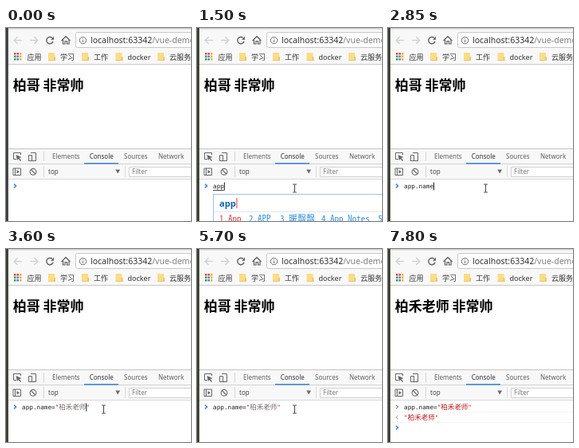
An HTML page with a canvas that plays this animation: 232x242 px, repeating every 7950 ms.

```html
<!DOCTYPE html>
<html lang="zh">
<head>
<meta charset="utf-8">
<title>Console demo</title>
<style>
html, body { margin: 0; width: 100%; height: 100%; overflow: hidden; background: #fff; }
canvas { display: block; width: 232px; height: 242px; }
</style>
</head>
<body>
<canvas id="stage"></canvas>
<script>
const W = 232, H = 242, LOOP = 7950;
const UI = '"Noto Sans", "Noto Sans CJK SC", "Noto Sans CJK", sans-serif';
const CJK = '"Noto Sans CJK SC", "Noto Sans CJK", "Noto Sans", sans-serif';
const CJK_MONO = '"Noto Sans Mono CJK SC", "Noto Sans CJK SC", "Noto Sans CJK", monospace';
const MONO = '"DejaVu Sans Mono", monospace';
const OLD_NAME = '柏哥', NEW_NAME = '柏禾老师';
const RED = '#c41a16';

const canvas = document.getElementById('stage');
const ctx = canvas.getContext('2d');
const scale = window.devicePixelRatio || 1;
canvas.width = Math.round(W * scale);
canvas.height = Math.round(H * scale);

function box(x, y, w, h, color) {
  ctx.fillStyle = color;
  ctx.fillRect(x, y, w, h);
}

function text(str, x, y, size, color, family = UI, weight = 400) {
  ctx.font = `${weight} ${size}px ${family}`;
  ctx.fillStyle = color;
  ctx.fillText(str, x, y);
  return x + ctx.measureText(str).width;
}

function line(points, color, width = 1, close = false) {
  ctx.beginPath();
  points.forEach(([x, y]) => ctx.lineTo(x, y));
  if (close) ctx.closePath();
  ctx.strokeStyle = color;
  ctx.lineWidth = width;
  ctx.stroke();
}

function fill(points, color) {
  ctx.beginPath();
  points.forEach(([x, y]) => ctx.lineTo(x, y));
  ctx.closePath();
  ctx.fillStyle = color;
  ctx.fill();
}

function arc(x, y, r, color, width = 1, from = 0, to = 7) {
  ctx.beginPath();
  ctx.arc(x, y, r, from, Math.min(to, from + Math.PI * 2));
  ctx.strokeStyle = color;
  ctx.lineWidth = width;
  ctx.stroke();
}

function arrow(x, y, dir, color) {
  line([[x - 5 * dir, y], [x + 4.5 * dir, y]], color, 1.3);
  line([[x + .3 * dir, y - 4.5], [x + 4.8 * dir, y], [x + .3 * dir, y + 4.5]], color, 1.3);
}

function folder(x) {
  box(x, 31, 8, 10, '#fbdc86');
  box(x + 7, 36, 2, 5, '#f0c75e');
  box(x, 40, 9, 1, '#efc766');
}

function browser() {
  box(3, 0, W, 46, '#f8f8f8');
  box(3, 0, W, 1.5, '#cfcfcf');
  arrow(15, 15.5, -1, '#d0d0d0');
  arrow(35, 15.5, 1, '#d0d0d0');
  arc(55, 15.5, 4.2, '#606060', 1.4, .3, 5.4);
  fill([[56, 14.8], [60, 14.8], [60, 10.5]], '#606060');
  line([[69.5, 16], [75, 10.5], [80.5, 16]], '#606060', 1.3);
  line([[71.5, 15], [71.5, 20], [74, 20], [74, 16.5], [76.5, 16.5], [76.5, 20], [79, 20], [79, 15]], '#606060', 1.2);

  ctx.beginPath();
  ctx.roundRect(87.5, 5.5, 160, 19, 2);
  ctx.fillStyle = '#fff';
  ctx.fill();
  ctx.strokeStyle = '#c8c8c8';
  ctx.lineWidth = 1;
  ctx.stroke();
  arc(96.5, 15.5, 4.2, '#707070');
  box(96, 15, 1, 3, '#707070');
  box(96, 13, 1, 1, '#707070');
  const end = text('localhost:63342', 106, 19, 10.5, '#333');
  text('/vue-demo', end, 19, 10.5, '#808080');

  const dots = ['#e0483e', '#e0483e', '#f0b32c', '#3f9a57', '#4683df', '#f0b32c', '#3f9a57', '#4683df', '#f0b32c'];
  dots.forEach((c, i) => box(10 + i % 3 * 3.5, 31 + Math.floor(i / 3) * 3.5, 2.5, 2.5, c));
  text('应用', 26.5, 39.5, 9, '#333', CJK);
  [[53, '学习'], [95, '工作'], [137.5, 'docker'], [190, '云服务']].forEach(([x, label]) => {
    folder(x);
    text(label, x + 15, 39.5, 9, '#333', label === 'docker' ? UI : CJK);
  });
  box(3, 45, W, 1, '#c8c8c8');
}

function devtools() {
  const ink = '#666';
  box(3, 151, W, 39, '#f8f8f8');
  box(3, 151, W, 1, '#c4c4c4');
  box(3, 170, W, 1, '#d2d2d2');
  box(3, 189, W, 1, '#d8d8d8');

  line([[13, 164.5], [9.5, 164.5], [9.5, 156.5], [18.5, 156.5], [18.5, 159]], ink);
  fill([[12.5, 159], [19.5, 162], [16.5, 163], [19, 166], [18, 167], [15.5, 164], [14, 166]], ink);
  line([[31, 156.5], [37.5, 156.5], [37.5, 166.5], [31.5, 166.5]], ink);
  line([[28.5, 159.5], [32.5, 159.5], [32.5, 166.5], [28.5, 166.5]], ink, 1, true);
  box(47, 155, 1, 12, '#d4d4d4');
  [['Elements', 58], ['Console', 104.7], ['Sources', 148], ['Network', 191]].forEach(([tab, x]) =>
    text(tab, x, 164, 8, tab === 'Console' ? '#333' : '#5f5f5f'));
  box(98, 169, 43, 1.6, '#3f8be8');

  line([[9, 176], [18.5, 176], [18.5, 184.5], [9, 184.5]], ink, 1, true);
  line([[11.5, 176], [11.5, 184]], ink);
  fill([[13.5, 178], [17, 180.3], [13.5, 182.5]], ink);
  arc(34, 180.3, 3.9, ink, 1.1);
  line([[31.3, 177.5], [36.8, 183]], ink, 1.1);
  box(47, 173, 1, 14, '#d6d6d6');
  text('top', 53, 183, 8, '#444');
  fill([[137.3, 177.5], [143, 177.5], [140.2, 182.5]], '#6a6a6a');
  box(149, 173, 1, 14, '#dcdcdc');
  box(154, 174, W, 13, '#fff');
  line([[W + 2, 174.5], [154.5, 174.5], [154.5, 186.5], [W + 2, 186.5]], '#d2d2d2');
  text('Filter', 158, 183.3, 8, '#777');
}

const mono = (str, x, y, color) => text(str, x, y, 7.7, color, MONO);

function quoted(str, x, y, color, inner) {
  x = mono('"', x, y, color);
  x = text(str, x, y, 8.5, inner, CJK);
  return [x, mono('"', x, y, color)];
}

function chevron(y, color, dir = 1, width = 1.3) {
  line([[11.3 - 1.3 * dir, y - 2.4], [11.3 + 1.3 * dir, y], [11.3 - 1.3 * dir, y + 2.4]], color, width);
}

function popup(typed, candidates) {
  box(20, 208, W, H, '#9fc3e6');
  box(21, 209, W, H, '#fff');
  const end = text(typed, 28, 223.5, 11.2, '#0b62bd', UI, 600);
  box(end + .5, 213, 1, 13, '#e23c3c');
  box(21, 230, W, 1, '#dde8f2');
  candidates.forEach(([x, label], i) => text(label, x, 243, 11, i ? '#2f90e0' : '#e04040', CJK_MONO));
}

// Each step: start time, command typed so far, caret visible
const steps = [
  [0, '', 0], [600, '', 1],
  [1200, 'a', 1], [1350, 'ap', 1], [1500, 'app', 1],
  [1800, 'app', 1], [1950, 'app.', 1], [2100, 'app.n', 1], [2250, 'app.nam', 1],
  [2400, 'app.name', 0], [2850, 'app.name', 1], [3000, 'app.name=', 1],
  [3150, 'app.name=""', 1], [3600, 'app.name="*"', 1],
  [4050, 'app.name="*"', 0], [4350, 'app.name="*"', 1], [4800, 'app.name="*"', 0],
  [5250, 'app.name="*"', 1], [5700, 'app.name="*"', 0]
];

function command(t, done) {
  const [, typed, caret] = steps.filter(s => s[0] <= t).pop();
  const [code, rest] = typed.split('"');
  let x = mono(code, 20, 201, '#222');
  if (rest !== undefined) {
    [x] = quoted(rest ? NEW_NAME : '', x, 201, RED, done ? RED : '#77706e');
  }
  if (t >= 1200 && t < 1800) box(20, 203, x - 20, 1, '#444');
  if (caret) box(x, 193.5, 1, 10, '#222');
}

function ibeam(x, y) {
  line([[x, y - 5], [x, y + 5]], '#444');
  [-5, 5].forEach(d => line([[x - 2.5, y + d], [x + 2.5, y + d]], '#555'));
}

function pointer(x, y) {
  const shape = [[0, 0], [0, 11], [2.6, 8.7], [4.4, 12.8], [6.2, 12], [4.4, 8], [8, 8]]
    .map(([dx, dy]) => [x + dx, y + dy]);
  fill(shape, '#fff');
  line(shape, '#666', .9, true);
}

function consoleView(t) {
  const done = t >= 6150;
  chevron(198, done ? '#858585' : '#3b82e0', 1, done ? 1.1 : 1.5);
  command(t, done);
  if (done) {
    box(3, 204, W, 1, '#f4f4f4');
    chevron(211, '#b4b4b4', -1, 1.1);
    quoted(NEW_NAME, 20, 214, RED, RED);
    box(3, 217, W, 1, '#f4f4f4');
    chevron(224, '#3b8ee8', 1, 1.5);
  }

  if (t >= 1200 && t < 1800) {
    popup('app'.slice(0, Math.floor((t - 1200) / 150) + 1),
      [[28, '1.App'], [65, '2.APP'], [104, '3.暖飘飘'], [156, '4.App Notes'], [227, '5.']]);
  } else if (t >= 3300 && t < 3600) {
    popup(t < 3450 ? "bai'he" : "bai'he'lao'shi",
      [[28, '1.' + NEW_NAME], [92, '2.柏禾'], [134, '3.百合'], [176, '4.白鹤']]);
  }

  if (t >= 450 && t < 6150) ibeam(122.5, 201);
  else if (done && t < 7200) pointer(120.5, 200.5);
}

function draw(t) {
  ctx.setTransform(scale, 0, 0, scale, 0, 0);
  box(0, 0, W, H, '#fff');
  browser();
  const name = t < 6150 ? OLD_NAME : NEW_NAME;
  text(`${name} 非常帅`, 8.7, 78, 17, '#000', CJK, 700);
  devtools();
  consoleView(t);
  box(0, 0, 2, H, '#3b3d3f');
  box(2, 0, 1, H, t < 150 ? '#54575a' : '#46561f');
}

function tick(now) {
  draw(now % LOOP);
  requestAnimationFrame(tick);
}
draw(0);
requestAnimationFrame(tick);
</script>
</body>
</html>
```
